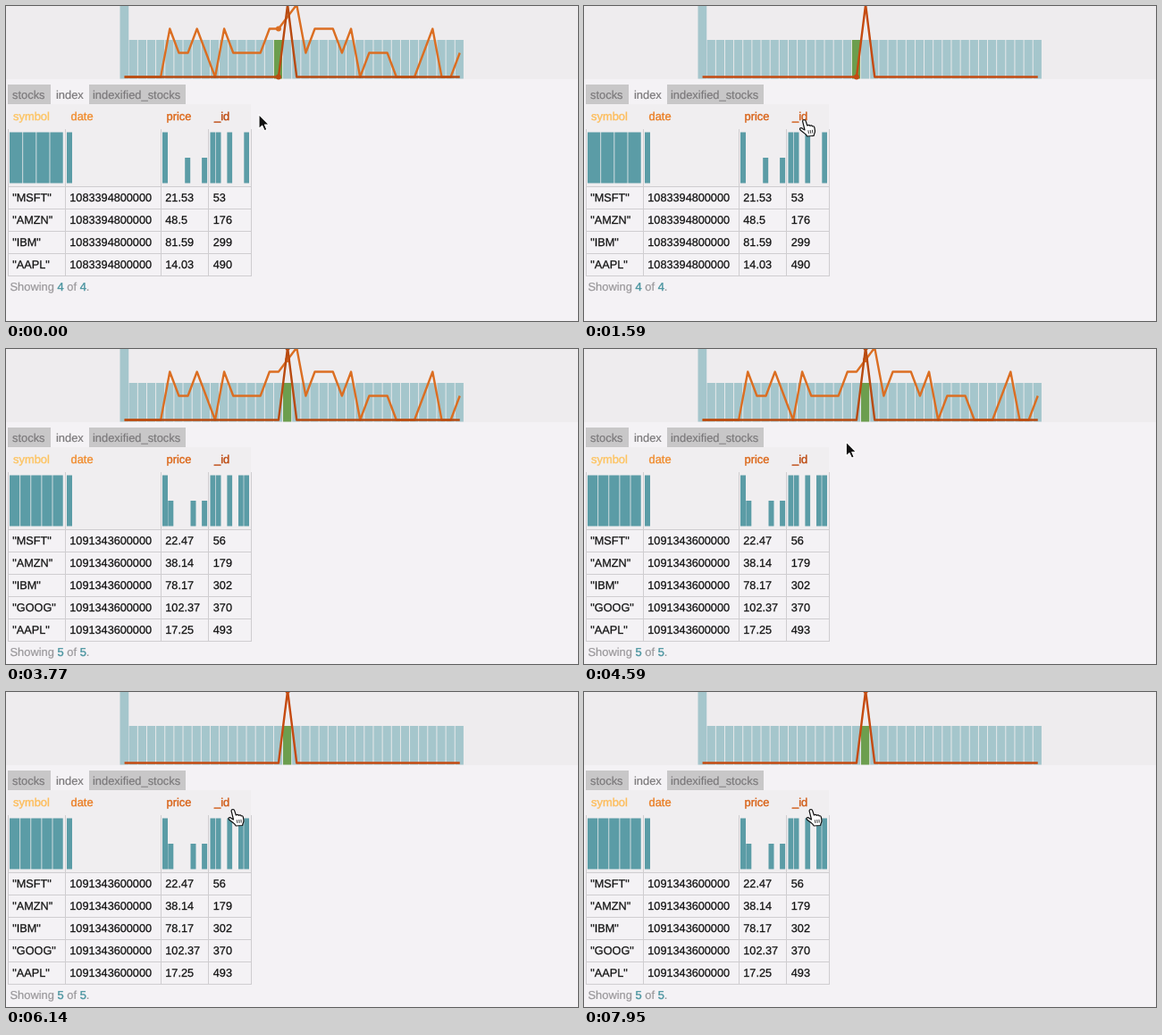
These frames come from a looping animation (640x353 px, 8 s). An HTML page:

```html
<!DOCTYPE html>
<html lang="en">
<head>
<meta charset="utf-8">
<title>Index table</title>
<style>
  html, body { margin: 0; width: 100%; height: 100%; overflow: hidden; background: #f4f2f5; }
  svg { display: block; width: 640px; height: 353px; font: 12.9px "Liberation Sans", Arial, sans-serif; text-rendering: geometricPrecision; }
  .grid { stroke: #cfcdd0; fill: none; shape-rendering: crispEdges; }
  .bars { fill: #5b9ca6; }
  .line { fill: none; stroke-width: 2.4; stroke-linejoin: round; }
  .tab { fill: #c8c7c8; }
  .tabs text { fill: #7b797b; stroke: #7b797b; stroke-width: .2; }
  .head text { stroke-width: .4; }
  .rows { fill: #111; stroke: #111; stroke-width: .25; font-size: 12.7px; }
  .count { fill: #99979a; stroke: #99979a; stroke-width: .2; }
  .count tspan { fill: #4b95a0; stroke: #4b95a0; stroke-width: .4; }
</style>
</head>
<body>
<svg viewBox="0 0 640 353">
  <rect width="640" height="353" fill="#f4f2f5"/>
  <rect width="640" height="82" fill="#eeecee"/>
  <g id="months"></g>
  <g id="priceLine"></g>
  <g id="idLine"></g>
  <g class="tabs">
    <rect class="tab" x="2" y="88" width="48" height="22"/>
    <rect class="tab" x="93" y="88" width="108" height="22"/>
    <text x="7" y="104">stocks</text>
    <text x="56" y="104">index</text>
    <text x="97" y="104">indexified_stocks</text>
  </g>
  <rect x="2" y="110" width="272" height="92" fill="#f0eef0"/>
  <g class="head" id="head"></g>
  <g id="tables"></g>
  <path id="arrow" d="M0 0V16L3.7 12.7 6.2 18.3 8.9 17.1 6.5 11.6H11.4Z"
        fill="#111" stroke="#fff" stroke-width="1.1" stroke-linejoin="round"/>
  <g id="hand">
    <g transform="scale(.95 .88)" fill="#fff" stroke="#111" stroke-width="1.3" stroke-linejoin="round">
      <path d="M-2 1.8Q-1.9 0 -.2 0 1.4 .1 1.8 1.8L3.5 7.4Q5.6 6 6.8 7.8 8.6 6.5 9.7 8.4 11.5 7.6 12 10
               L12.6 14.2Q12.6 16.6 11.6 18.2L11.2 20.4 3.4 21 1.8 18.6-4.4 13.4Q-6 11.6-4.6 10.6-3.3 10-1.8 11.6L.5 13Z"/>
      <path d="M4.6 13.4L5.2 17.6M7 13.1L7.6 17.4M9.4 12.8L9.8 17" stroke-width=".9"/>
    </g>
  </g>
</svg>
<script>
const LOOP = 8000;
const MONTHS = 38, STEP = 10.14, LEFT = 127.5;
const BASE = 79.5, UNIT = 27;
const NS = "http://www.w3.org/2000/svg";
const $ = id => document.getElementById(id);

function add(parent, tag, attrs, text = "") {
  const node = document.createElementNS(NS, tag);
  for (const key in attrs) node.setAttribute(key, attrs[key]);
  node.textContent = text;
  return parent.appendChild(node);
}

const monthX = i => LEFT + STEP * (i + 0.5);
const levelY = level => BASE - UNIT * level;

// Upper chart
const months = Array.from({ length: MONTHS }, (_, i) => add($("months"), "rect", {
  x: LEFT + i * STEP, y: i ? 38 : 0, width: STEP - (i ? 0.9 : 0.4), height: i ? 43.5 : 81.5
}));

const priceLevels = [..."00000211210211112"].map(Number)
  .concat(2, 2.5, 3, [..."122212011100012001"].map(Number));
const idLevels = months.map((_, i) => i === 18 ? 3 : 0);

function addLine(group, levels) {
  add(group, "polyline", {
    class: "line", points: levels.map((v, i) => `${monthX(i)},${levelY(v)}`).join(" ")
  });
  return add(group, "circle", { r: 3, stroke: "none" });
}
const priceDot = addLine($("priceLine"), priceLevels);
const idDot = addLine($("idLine"), idLevels);

// Table
const columns = [2, 66, 173, 226, 274];
const headings = ["symbol", "date", "price", "_id"].map((name, i) =>
  add($("head"), "text", { x: [8, 72.5, 179.5, 233][i], y: 128 }, name));

function addTable({ rows, date, price, id }) {
  const g = add($("tables"), "g", {});
  const bottom = 202 + 25 * rows.length;
  let grid = "";
  for (const x of columns) grid += `M${x + 0.5} 138V${bottom + 0.5}`;
  for (let y = 202; y <= bottom; y += 25) grid += `M2 ${y + 0.5}H275`;
  add(g, "path", { class: "grid", d: grid });

  const bars = add(g, "g", { class: "bars" });
  const bar = (x, width = 6, full = true) =>
    add(bars, "rect", { x, y: full ? 141.5 : 170, width, height: full ? 57 : 28.5 });
  const symbolWidth = 60.5 / rows.length;
  rows.forEach((_, i) => bar(4 + i * symbolWidth, symbolWidth - 0.8));
  bar(68);
  price.forEach((slot, i) => bar(175 + slot * 6.3, 6, i === 0));
  id.forEach(slot => bar(228.5 + slot * 6.3, 5.7));

  const body = add(g, "g", { class: "rows" });
  rows.forEach(([symbol, cost, key], r) =>
    [`"${symbol}"`, date, cost, key].forEach((value, c) =>
      add(body, "text", { x: [7.3, 71.3, 178.3, 231.8][c], y: 219.2 + 25 * r }, value)));

  const count = add(g, "text", { class: "count", x: 4.5, y: bottom + 17 }, "Showing ");
  add(count, "tspan", {}, rows.length);
  count.append(" of ");
  add(count, "tspan", {}, rows.length);
  count.append(".");
  return g;
}

const tables = [
  addTable({
    date: "1083394800000", price: [0, 4, 7], id: [0, 1, 3, 6],
    rows: [["MSFT", "21.53", "53"], ["AMZN", "48.5", "176"], ["IBM", "81.59", "299"], ["AAPL", "14.03", "490"]]
  }),
  addTable({
    date: "1091343600000", price: [0, 1, 5, 7], id: [0, 1, 3, 5, 6],
    rows: [["MSFT", "22.47", "56"], ["AMZN", "38.14", "179"], ["IBM", "78.17", "302"],
           ["GOOG", "102.37", "370"], ["AAPL", "17.25", "493"]]
  })
];

// Pointer path: time, x, y
const path = [
  [0, 283, 121.5], [250, 283, 122], [900, 246.5, 127.5], [2150, 246.5, 127.5], [2600, 286, 127],
  [2720, 286, 127], [3180, 314, -24], [4250, 314, -24], [4650, 292, 112], [4980, 254, 131.5],
  [6150, 254, 131.5], [6650, 289, 119.5], [6950, 289, 119.5], [7450, 254, 131.5], [8000, 254, 131.5]
];
const hovers = [[560, 2390], [4800, 6400], [7200, 8000]];
const NEXT_MONTH = 3100;

function pointerAt(t) {
  const k = path.findIndex(p => p[0] > t);
  const [t0, x0, y0] = path[k - 1], [t1, x1, y1] = path[k];
  const u = (t - t0) / (t1 - t0), e = u * u * (3 - 2 * u);
  return [x0 + (x1 - x0) * e, y0 + (y1 - y0) * e];
}

const show = (node, on) => node.setAttribute("visibility", on ? "visible" : "hidden");
const paint = (node, color) => {
  node.setAttribute("fill", color);
  node.setAttribute("stroke", color);
};

function render(t) {
  const hover = hovers.some(([from, to]) => t >= from && t < to);
  const later = t >= NEXT_MONTH;
  const picked = later ? 18 : 17;

  months.forEach((node, i) => node.setAttribute("fill", i === picked ? "#6c9e4e" : "#a5c6cc"));
  [[priceDot, priceLevels], [idDot, idLevels]].forEach(([dot, levels]) => {
    dot.setAttribute("cx", monthX(picked));
    dot.setAttribute("cy", levelY(levels[picked]));
  });
  show($("priceLine"), !hover);
  paint($("priceLine"), "#db6e22");
  paint($("idLine"), hover ? "#c54a10" : "#b84a10");

  const colors = hover ? ["#fdbd5c", "#ea7f26", "#d9641a", "#d05c18"]
                       : ["#fdc463", "#f08d30", "#dc681a", "#bd4a10"];
  headings.forEach((node, i) => paint(node, colors[i]));
  tables.forEach((node, i) => show(node, later === !!i));

  const [x, y] = pointerAt(t);
  for (const id of ["arrow", "hand"]) {
    $(id).setAttribute("transform", `translate(${x} ${y})`);
    show($(id), (id === "hand") === hover);
  }
}

const start = performance.now();
function tick(now) {
  render(Math.max(0, now - start) % LOOP);
  requestAnimationFrame(tick);
}
render(0);
requestAnimationFrame(tick);
</script>
</body>
</html>
```
